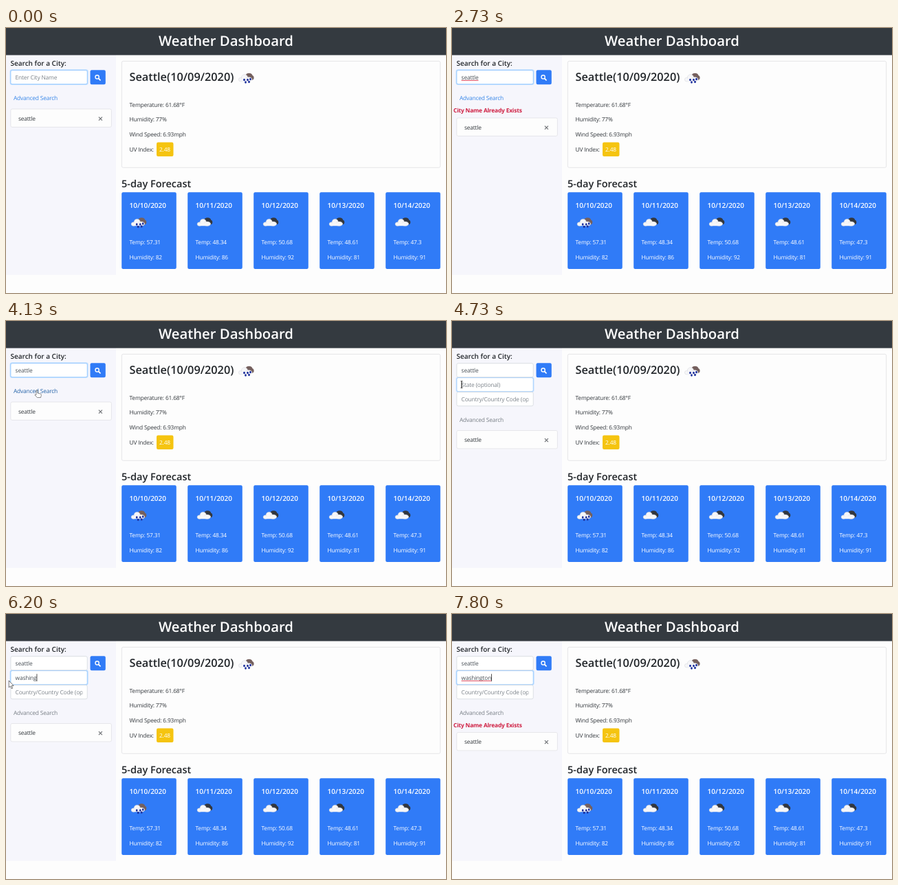
These frames come from a looping animation (640 px wide and 386 px high, 8 s). An HTML page:

```html
<!DOCTYPE html>
<html lang="en">
<head>
<meta charset="utf-8">
<title>Weather Dashboard</title>
<style>
html, body { margin: 0; width: 100%; height: 100%; overflow: hidden; background: #fdfdfd }
svg { display: block }
text { font: 8.4px "Open Sans", "Noto Sans", sans-serif; letter-spacing: -.18px; fill: #33383d; white-space: pre; text-rendering: geometricPrecision }
.title, .h2, .h3, .h5 { font-weight: 600; letter-spacing: 0; fill: #212529 }
.title { font-size: 20.3px; text-anchor: middle }
.h2 { font-size: 16.3px }
.h3 { font-size: 14.5px }
.h5 { font-size: 10px }
.title, .white { fill: #fff }
.error { font-weight: 700; fill: #cf1f42 }
</style>
</head>
<body>
<svg id="stage" width="640" height="386" viewBox="0 0 640 386"></svg>
<script>
const LOOP = 8000, BLUE = '#307bf7';

const text = (x, y, s, cls = '', extra = '') => `<text x="${x}" y="${y}" class="${cls}" ${extra}>${s}</text>`;
const box = (x, y, w, h, fill, extra = '') => `<rect x="${x}" y="${y}" width="${w}" height="${h}" fill="${fill}" ${extra}/>`;
const oval = (x, y, rx, ry) => `<ellipse cx="${x}" cy="${y}" rx="${rx}" ry="${ry}"/>`;

// Weather icon centred on x, y
function icon(x, y, rain) {
  const drops = [[-3, 3], [2, 3], [6, 2], [-1, 6.5], [4, 6]];
  return `<g transform="translate(${x} ${y})">
    <g fill="${rain ? '#75605e' : '#33373e'}">${oval(4, -3, 5, 3.8) + oval(7.5, 0, 3.6, 3.4)}</g>
    <g fill="#f6f6f8" stroke="#c9ccd3" stroke-width=".4">${oval(-7.5, 2.6, 3.6, 2.9) + oval(-2.5, -.4, 4.6, 4.4) + oval(3.5, 2.2, 5, 3.2)}</g>
    <g fill="#f6f6f8">${oval(-1.8, 3, 8, 2.3)}</g>
    ${rain ? `<g fill="#1c2f9c">${drops.map(([a, b]) => oval(a, b, 1.4, 1.7)).join('')}</g>` : ''}
  </g>`;
}

function field(id, y, hint) {
  return `<g id="${id}">
    <rect class="glow" x="5.6" y="${y - 1.1}" width="114" height="22.8" rx="3.3" fill="#bfdeff"/>
    <rect class="edge" x="6.9" y="${y + .3}" width="111.3" height="20.2" rx="2.2" fill="#fff" stroke-width=".7"/>
    <svg x="7" y="${y}" width="104.5" height="21"><text x="6.6" y="13.6">${hint}</text></svg>
    <path class="squiggle" stroke="#d9364c" stroke-width=".9" fill="none"/>
    <path class="caret" stroke="#222" stroke-width=".8"/>
  </g>`;
}

const days = [['10', 57.31, 82], ['11', 48.34, 86], ['12', 50.68, 92], ['13', 48.61, 81], ['14', 47.3, 91]];
const cards = days.map(([day, temp, humidity], i) => {
  const x = 168.2 + 96 * i;
  return box(x, 239.3, 79.6, 111.6, BLUE, 'rx="2.2"') +
    text(x + 11.3, 261.5, `10/${day}/2020`, 'h5 white') +
    icon(x + 25, 283, i === 0) +
    text(x + 11.3, 314.5, `Temp: ${temp}`, 'white') +
    text(x + 11.3, 336.5, `Humidity: ${humidity}`, 'white');
});

const $ = id => document.getElementById(id);
$('stage').innerHTML =
  box(0, 39, 160, 320.5, '#f6f6fc') +
  box(0, 0, 640, 39.5, '#343a40') + text(320, 26, 'Weather Dashboard', 'title') +
  text(6.5, 54.5, 'Search for a City:', 'h5') +
  `<g id="extra">${field('state', 82.3, 'State (optional)') + field('country', 103.3, 'Country/Country Code (optional)')}</g>` +
  field('city', 61.3, 'Enter City Name') +
  box(122.5, 61.3, 22.3, 21, BLUE, 'rx="2.2"') +
  '<path d="M134.8 73.6l2.2 2.2" stroke="#fff" stroke-width="1.8" stroke-linecap="round"/><circle cx="132.6" cy="71.4" r="2.6" fill="none" stroke="#fff" stroke-width="1.4"/>' +
  text(11, 105.3, 'Advanced Search', '', 'id="link"') +
  text(2, 123, 'City Name Already Exists', 'error', 'id="error"') +
  `<g id="row">${box(6.8, 118, 146.6, 26.4, '#fdfdfd', 'rx="2.2" stroke="#dfdfe3" stroke-width=".7"')}
    ${text(18, 134.5, 'seattle')}<path d="M134.9 129.7l5 5m0-5l-5 5" stroke="#6f7276" stroke-width="1.2"/></g>` +
  box(168.3, 48.3, 463.4, 155, '#fdfdfd', 'rx="2.2" stroke="#dcdcde" stroke-width=".7"') +
  text(179.5, 77, 'Seattle(10/09/2020)', 'h2') + icon(349.5, 72.5, true) +
  ['Temperature: 61.68°F', 'Humidity: 77%', 'Wind Speed: 6.93mph', 'UV Index:']
    .map((s, i) => text(179.5, 114.5 + 21.9 * i, s)).join('') +
  box(219, 166.5, 24.5, 20.5, '#f5c410', 'rx="2.2"') + text(223, 180.2, '2.48', 'white') +
  text(168, 231.5, '5-day Forecast', 'h3') + cards.join('') +
  `<g id="mouse" stroke-width=".6" stroke-linejoin="round">
    <path id="arrow" d="M0 0v10l2.3-2 1.6 3.7 1.6-.7-1.6-3.5h3z" fill="#fff" stroke="#222"/>
    <path id="hand" d="M-1 0q1-1 2 0v4l4.5 1.2q1 .5.8 2l-.8 3.3h-5L-3 7q-.5-1.5 2-.5z" fill="#fff" stroke="#444"/>
    <path id="beam" d="M-1.5-5h3m-1.5 0v10m-1.5 0h3" fill="none" stroke="#222"/>
  </g>`;

// [time, x, y, shape]
const path = [
  [3400, 31, 23, 'arrow'], [3467, 35, 46, 'arrow'], [3530, 36, 61.5, 'arrow'], [3600, 37, 73, 'beam'],
  [3667, 38, 81, 'beam'], [3733, 39, 88, 'arrow'], [3800, 40, 93, 'arrow'], [3860, 41, 96, 'arrow'],
  [4000, 43, 99, 'hand'], [4067, 44, 100, 'hand'], [4130, 45, 101, 'hand'], [4260, 45, 105, 'beam'],
  [4600, 36, 101, 'beam'], [4667, 22, 95, 'beam'], [4730, 14, 92.5, 'beam'], [4800, 8, 95, 'beam'], [4860, 4.2, 97, 'arrow']
];
const cityKeys = [1200, 1330, 1530, 1730, 1930, 2060, 2200];
const stateKeys = [5330, 5530, 5730, 5860, 6000, 6060, 6200, 6460, 6600, 6667];
const during = (t, a, b) => t >= a && t < b;
const show = (node, on) => node.setAttribute('display', on ? 'inline' : 'none');
const typed = (word, keys, t) => word.slice(0, keys.filter(k => k <= t).length);
const clamp = v => Math.max(0, Math.min(1, v));

function setField(id, value, hint, focus, caret, misspelt) {
  const group = $(id), part = name => group.querySelector(name), label = part('text');
  label.textContent = value || hint;
  label.style.fill = value ? '#495057' : '#7c838a';
  part('.glow').setAttribute('opacity', focus);
  part('.edge').setAttribute('stroke', focus > .3 ? '#80bdff' : '#ced4da');
  const top = +part('.edge').getAttribute('y');
  const end = 13.6 + (value ? label.getComputedTextLength() : 0);
  part('.caret').setAttribute('d', `M${end + .4} ${top + 4.7}v10.8`);
  show(part('.caret'), caret);
  part('.squiggle').setAttribute('d', `M13.6 ${top + 14.8}H${end}`);
  show(part('.squiggle'), misspelt);
}

function draw(t) {
  const open = t >= 4260;
  const cityError = during(t, 2730, 3733), stateError = t >= 7200, failed = cityError || stateError;
  const cityCaret = during(t, 460, 1000) || during(t, 1200, 2730) || during(t, 3260, 3800);
  const stateCaret = during(t, 4667, 5060) || during(t, 5330, 7330) || t >= 7800;

  setField('city', typed('seattle', cityKeys, t), 'Enter City Name', 1 - clamp((t - 4260) / 150), cityCaret, cityError);
  setField('state', typed('washington', stateKeys, t), 'State (optional)', clamp((t - 4640) / 150), stateCaret, stateError);
  setField('country', '', 'Country/Country Code (optional)', 0, false, false);
  show($('extra'), open);

  const drop = open ? 41.5 : 0;
  for (const id of ['link', 'error']) $(id).setAttribute('transform', `translate(0 ${drop})`);
  $('row').setAttribute('transform', `translate(0 ${drop + (failed ? 13 : 0)})`);
  $('link').style.fill = open ? '#777e85' : t >= 4000 ? '#2362a8' : '#3585e8';
  show($('error'), failed);

  const spot = path.filter(p => p[0] <= t).pop();
  show($('mouse'), spot && t < 6800);
  if (spot) {
    $('mouse').setAttribute('transform', `translate(${spot[1]} ${spot[2]})`);
    for (const id of ['arrow', 'hand', 'beam']) show($(id), id === spot[3]);
  }
}

const start = performance.now();
function tick() {
  draw((performance.now() - start) % LOOP);
  requestAnimationFrame(tick);
}
tick();
</script>
</body>
</html>
```
